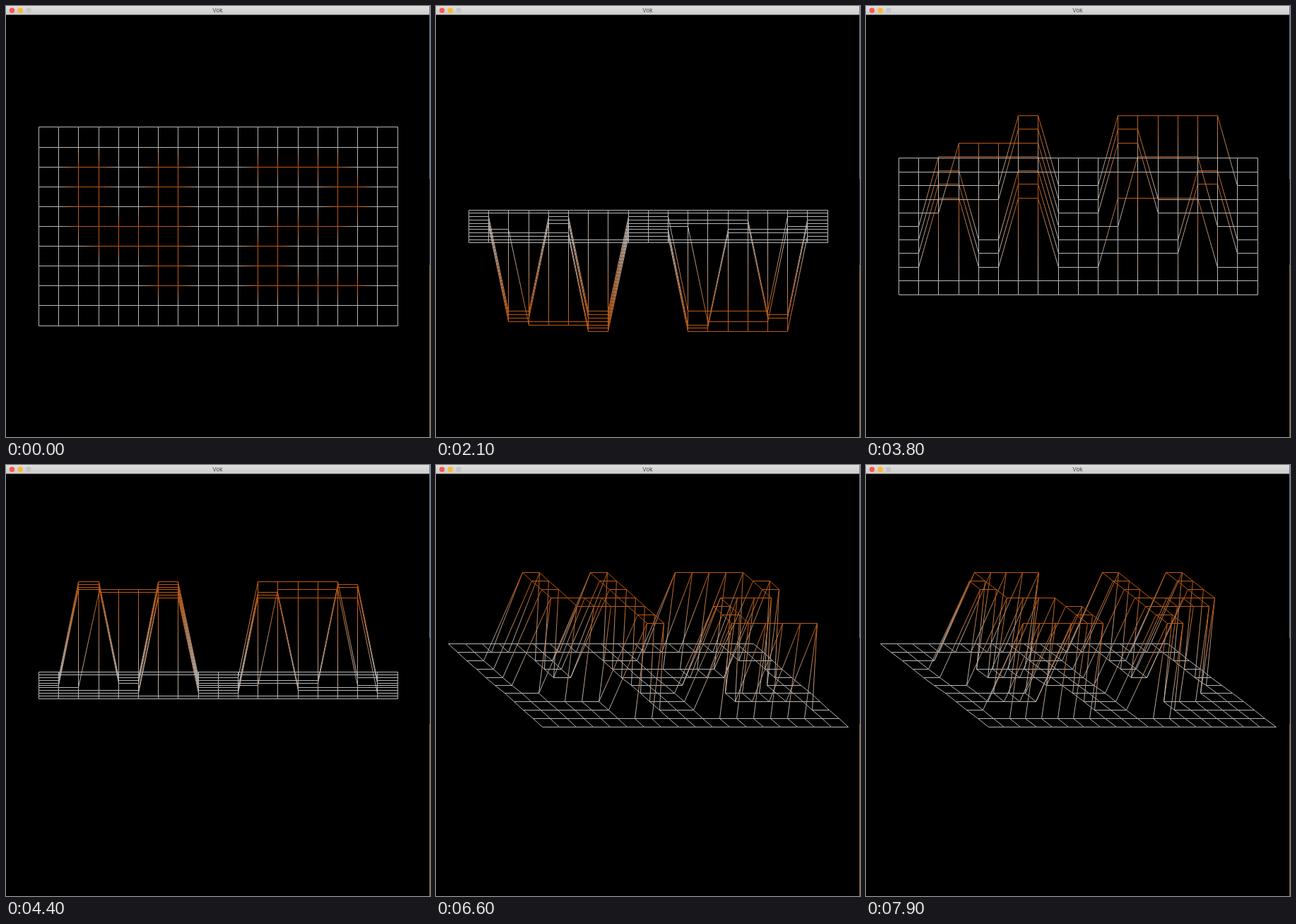
These frames come from a looping animation (600x611 px, 8 s). An HTML page with a canvas:

```html
<!DOCTYPE html>
<html lang="en">
<head>
<meta charset="utf-8">
<title>Wireframe</title>
<style>
  html, body { margin: 0; width: 100%; height: 100%; overflow: hidden; background: #000; }
  canvas { display: block; }
</style>
</head>
<body>
<canvas id="stage" width="600" height="611"></canvas>
<script>
const ctx = document.getElementById('stage').getContext('2d');

const LOOP = 8000, TICK = 100;
const STEP = 0.05;               // radians per key repeat
const CELL = 28.2, HEIGHT = 137.3;
const CX = 299.8, CY = 312;
const LOW = 'rgb(182,182,182)', HIGH = 'rgb(188,88,16)';

// Height map: # is raised
const MAP = [
  '...................',
  '...................',
  '..##..##...#####...',
  '..##..##.......##..',
  '..##..##.......##..',
  '..######....####...',
  '...#####...##......',
  '......##...##......',
  '......##...######..',
  '...................',
  '...................',
].map(row => [...row].map(c => c === '#'));
const ROWS = MAP.length, COLS = MAP[0].length;

// One press, a pause, then three repeats per tick
function tiltSteps(tick) {
  if (tick < 10) return 0;
  if (tick < 13) return 1;
  if (tick < 54) return Math.min(101, 4 + 3 * (tick - 13));
  return tick < 56 ? 102 : 103;
}

function turnSteps(tick) {
  if (tick < 61) return 0;
  return tick < 63 ? 1 : 2 + 3 * (tick - 63);
}

function project(col, row, tilt, turn) {
  const u = (col - (COLS - 1) / 2) * CELL;
  const v = (row - (ROWS - 1) / 2) * CELL;
  const h = MAP[row][col] ? HEIGHT : 0;
  const y = v * Math.cos(tilt) + h * Math.sin(tilt);
  const depth = h * Math.cos(tilt) - v * Math.sin(tilt);
  const x = u * Math.cos(turn) + depth * Math.sin(turn);
  return {
    x: Math.round(CX + x) + 0.5,
    y: CY + Math.trunc(y) + 0.5,
    color: h ? HIGH : LOW,
  };
}

function edge(a, b) {
  let style = a.color;
  if (a.color !== b.color) {
    style = ctx.createLinearGradient(a.x, a.y, b.x, b.y);
    style.addColorStop(0, a.color);
    style.addColorStop(1, b.color);
  }
  ctx.strokeStyle = style;
  ctx.beginPath();
  ctx.moveTo(a.x, a.y);
  ctx.lineTo(b.x, b.y);
  ctx.stroke();
}

function drawMesh(tilt, turn) {
  ctx.lineWidth = 1;
  const points = MAP.map((cells, row) => cells.map((_, col) => project(col, row, tilt, turn)));
  for (let row = 0; row < ROWS; row++) {
    for (let col = 0; col < COLS; col++) {
      if (col + 1 < COLS) edge(points[row][col], points[row][col + 1]);
      if (row + 1 < ROWS) edge(points[row][col], points[row + 1][col]);
    }
  }
}

function rect(color, x, y, w, h) {
  ctx.fillStyle = color;
  ctx.fillRect(x, y, w, h);
}

function drawWindow() {
  rect('#000', 0, 0, 600, 611);
  const bar = ctx.createLinearGradient(0, 0, 0, 12);
  bar.addColorStop(0, '#e0e0e0');
  bar.addColorStop(1, '#cccccc');
  rect(bar, 0, 0, 599, 12);
  rect('#a8a8a8', 0, 12, 599, 0.6);

  // Sliver of desktop along the right edge
  rect('#62789a', 599, 0, 1, 245);
  rect('#30343a', 599, 245, 1, 122);
  rect('#8f6630', 599, 367, 1, 244);

  ['#fc5651', '#fdb92f', '#c6c6c6'].forEach((color, i) => {
    ctx.fillStyle = color;
    ctx.beginPath();
    ctx.arc(8.5 + 11.8 * i, 6.2, 3.7, 0, 2 * Math.PI);
    ctx.fill();
  });

  ctx.fillStyle = '#444';
  ctx.font = '8px Inter, sans-serif';
  ctx.textAlign = 'center';
  ctx.fillText('Vok', 299.5, 9);
}

function draw() {
  const tick = Math.floor(performance.now() % LOOP / TICK);
  drawWindow();
  drawMesh(tiltSteps(tick) * STEP, turnSteps(tick) * STEP);
  requestAnimationFrame(draw);
}
draw();
</script>
</body>
</html>
```
